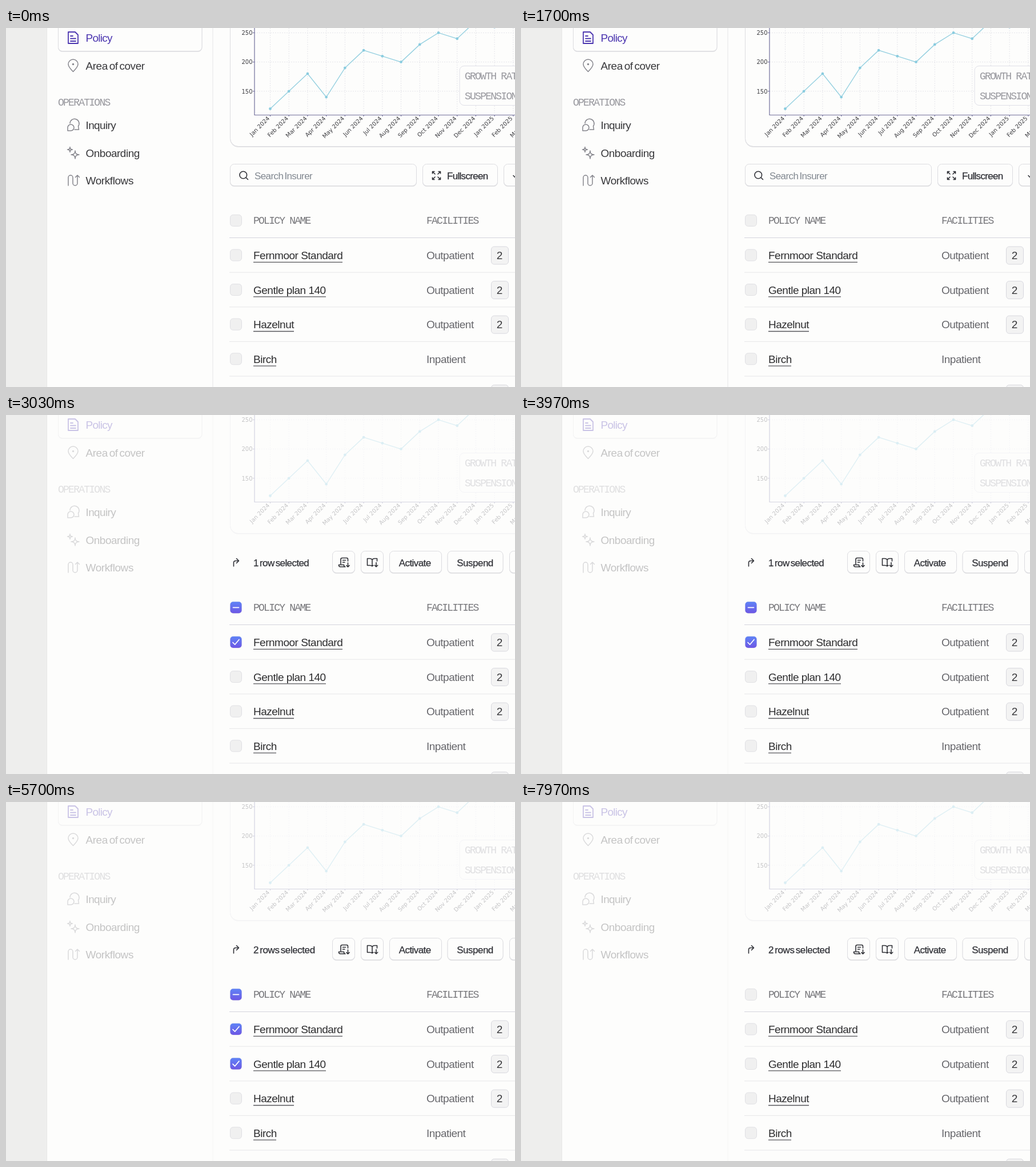
An HTML page for the animation above (8 s loop, 891 by 629 pixels).

```html
<!DOCTYPE html>
<html lang="en">
<head>
<meta charset="utf-8">
<title>Policy table</title>
<style>
  html, body { margin: 0; width: 100%; height: 100%; overflow: hidden; background: #fdfdfc; }
  svg { display: block; width: 891px; height: 629px; }
  text { font: 19px "Liberation Sans", Arial, sans-serif; letter-spacing: -.65px; word-spacing: -2px; fill: #38383b; }
  .name { letter-spacing: -.5px; word-spacing: 0; fill: #2c2c2e; }
  .cell { letter-spacing: -.5px; fill: #66666b; }
  .mono { font: 18px "Liberation Mono", monospace; letter-spacing: -1.75px; word-spacing: 0; fill: #77777b; }
  .pale { fill: #97979d; }
  .ui { font-size: 17px; fill: #2f3036; stroke: #2f3036; stroke-width: .25px; }
  .hint { font-size: 17px; letter-spacing: -.6px; fill: #818890; }
  .tick { font: 10px "DejaVu Sans", sans-serif; letter-spacing: 0; word-spacing: 0; fill: #3c3c40; }
  .icon { fill: none; stroke: #85858c; stroke-width: 1.5; stroke-linecap: round; stroke-linejoin: round; }
  .dark { stroke: #2f3036; stroke-width: 1.6; }
  .violet { stroke: #4c36b0; stroke-width: 1.8; }
  .grid { fill: none; stroke: #e5e5ea; stroke-dasharray: 2 2; }
  .axis { fill: none; stroke: #72709c; stroke-width: 1.2; }
  .rule { stroke: #e6e6e8; }
</style>
</head>
<body>
<svg viewBox="0 0 891 629">
  <defs>
    <linearGradient id="checked" x2="0" y2="1">
      <stop stop-color="#5f83f6"/><stop offset="1" stop-color="#6d57e4"/>
    </linearGradient>
    <clipPath id="barClip"><rect x="385" y="237.5" width="506" height="41.5"/></clipPath>
  </defs>
  <rect width="891" height="629" fill="#fdfdfc"/>
  <rect width="71" height="629" fill="#eeeeed"/>
  <path d="M71.5 0V629" stroke="#e8e8e6"/>
  <g id="backdrop"></g>
  <g id="table"></g>
  <g clip-path="url(#barClip)"><g id="searchBar"></g><g id="actionBar"></g></g>
</svg>
<script>
const LOOP = 8000;
const $ = id => document.getElementById(id);

function add(parent, tag, attrs = {}, content = '') {
  const el = document.createElementNS('http://www.w3.org/2000/svg', tag);
  for (const key in attrs) el.setAttribute(key, attrs[key]);
  el.textContent = content;
  return parent.appendChild(el);
}
const label = (parent, x, y, content, cls = '', spacing) =>
  add(parent, 'text', { x, y, class: cls, ...(spacing && { style: `letter-spacing:${spacing}px` }) }, content);
const icon = (parent, d, cls = '') => add(parent, 'path', { d, class: 'icon ' + cls });
const line = (parent, d, cls) => add(parent, 'path', { d, class: cls });

// A bordered panel with a slightly heavier lower edge.
function panel(parent, x, y, width, height, rx = 7) {
  add(parent, 'rect', { x, y: y + 1, width, height, rx, fill: '#cdcdd2', stroke: '#e6e6e8' });
  add(parent, 'rect', { x, y, width, height, rx, fill: '#fdfdfc', stroke: '#dcdce0' });
}

function drawSidebar(g) {
  line(g, 'M362 0V629', 'rule');
  panel(g, 91.5, -20, 251.5, 60.5);
  icon(g, 'M109 7H121L126 12V27H109ZM113 14H117M113 18.5H122M113 23H122', 'violet');
  label(g, 139.5, 24, 'Policy', '', -.75).style.fill = '#4c36b0';

  icon(g, 'M117.5 76.5C112 71 109 67.5 109 63.5A8.5 8.5 0 0 1 126 63.5C126 67.5 123 71 117.5 76.5Z');
  add(g, 'circle', { cx: 117.5, cy: 63.5, r: 1.7, fill: '#85858c' });
  label(g, 139.5, 72.5, 'Area of cover', '', -.45);

  label(g, 91, 136, 'OPERATIONS', 'mono pale');

  icon(g, 'M112 167A8 8 0 1 1 126.5 172L127.5 178H120');
  icon(g, 'M108 180V174.5A5.5 5.5 0 1 1 113.5 180Z');
  label(g, 139.5, 177, 'Inquiry');

  const star = (x, y, r) =>
    `M${x} ${y - r}Q${x} ${y} ${x + r} ${y}Q${x} ${y} ${x} ${y + r}Q${x} ${y} ${x - r} ${y}Q${x} ${y} ${x} ${y - r}Z`;
  icon(g, star(121, 222, 7) + star(112, 213, 4.5));
  label(g, 139.5, 225.5, 'Onboarding', '', -.5);

  icon(g, 'M109 276V262A4 4 0 0 1 117 262V272A4 4 0 0 0 125 272V258M121.5 261.5L125 258L128.5 261.5');
  label(g, 139.5, 274, 'Workflows', '', -.42);
}

function drawChart(g) {
  panel(g, 392.5, -40, 560, 247.5, 14);
  const values = [120, 150, 180, 140, 190, 220, 210, 200, 230, 250, 240, 270, 260, 280, 290];
  const months = 'Jan Feb Mar Apr May Jun Jul Aug Sep Oct Nov Dec'.split(' ');
  const px = i => 462.5 + 32.72 * i;
  const py = v => 8.4 + (250 - v) * 1.024;

  for (const v of [250, 200, 150]) {
    line(g, `M435 ${py(v)}H891`, 'grid');
    line(g, `M432 ${py(v)}H435`, 'axis');
    add(g, 'text', { x: 431.5, y: py(v) + 3.7, class: 'tick', 'text-anchor': 'end' }, v);
  }
  values.forEach((v, i) => {
    line(g, `M${px(i)} 0V152`, 'grid');
    line(g, `M${px(i)} 152V155`, 'axis');
    add(g, 'text', {
      class: 'tick', 'text-anchor': 'end',
      transform: `translate(${px(i) - .5} 159) rotate(-45)`
    }, `${months[i % 12]} ${2024 + Math.floor(i / 12)}`);
  });
  line(g, 'M435 0V152.5H891', 'axis');
  add(g, 'polyline', {
    points: values.map((v, i) => [px(i), py(v)]).join(' '),
    fill: 'none', stroke: '#96d0e0', 'stroke-width': 1.4
  });
  values.forEach((v, i) => add(g, 'circle', { cx: px(i), cy: py(v), r: 2.4, fill: '#8accdf' }));

  add(g, 'rect', { x: 794, y: 66.5, width: 160, height: 69, rx: 8, fill: '#fdfdfc', stroke: '#e0e0e8' });
  label(g, 803, 89.5, 'GROWTH RATE', 'mono pale');
  label(g, 803, 124.5, 'SUSPENSION', 'mono pale');
}

function checkbox(g, y, mark) {
  add(g, 'rect', { x: 392.5, y: y - 10, width: 20, height: 20, rx: 5, fill: '#f0f0f0', stroke: '#dfdfe3' });
  const on = add(g, 'g', { opacity: 0 });
  add(on, 'rect', { x: 392.5, y: y - 10, width: 20, height: 20, rx: 5, fill: 'url(#checked)' });
  add(on, 'path', {
    d: mark, transform: `translate(402.5 ${y})`, fill: 'none', stroke: '#fff',
    'stroke-width': 1.7, 'stroke-linecap': 'round', 'stroke-linejoin': 'round'
  });
  return on;
}

function drawTable(g) {
  const tick = 'M-5.5 .5L-1.8 4.2L5.5 -4.5';
  const marks = [checkbox(g, 337.3, 'M-5 0H5')];
  label(g, 433, 343.3, 'POLICY NAME', 'mono');
  label(g, 736, 343.3, 'FACILITIES', 'mono');
  line(g, 'M391 367.5H891', 'rule').style.stroke = '#d3d3dc';

  const rows = [['Fernmoor Standard', 156], ['Gentle plan 140', 127], ['Hazelnut', 71], ['Birch', 40], ['', 0]];
  rows.forEach(([name, width], i) => {
    const y = 398 + 60.6 * i;
    marks.push(checkbox(g, y, tick));
    label(g, 433, y + 7.2, name, 'name');
    add(g, 'path', { d: `M433 ${y + 12.3}h${width}`, stroke: '#55555a', 'stroke-width': 1.3 });
    line(g, `M391 ${y + 30.2}H891`, 'rule');
    const inpatient = i === 3;
    label(g, 736, y + 7.2, inpatient ? 'Inpatient' : 'Outpatient', 'cell');
    if (inpatient) return;
    add(g, 'rect', { x: 849.5, y: y - 15, width: 30, height: 31, rx: 5, fill: '#f3f3f3', stroke: '#d8d8de' });
    label(g, 858.8, y + 7.2, '2');
  });
  return marks;
}

function drawSearchBar(g) {
  panel(g, 392.5, 238.5, 326, 38);
  icon(g, 'M409 257.5a6.3 6.3 0 1 0 12.6 0a6.3 6.3 0 1 0 -12.6 0M420 262L423.5 265.5', 'dark');
  label(g, 435, 264.5, 'Search Insurer', 'hint');
  panel(g, 729.5, 238.5, 131, 38);
  icon(g, 'M746.5 255V251.5H750M747 252L751 256M757 251.5H760.5V255M760 252L756 256' +
          'M746.5 262V265.5H750M747 265L751 261M757 265.5H760.5V262M760 265L756 261', 'dark');
  label(g, 772, 264.5, 'Fullscreen', 'ui', -.7);
  panel(g, 871.5, 238.5, 90, 38);
  icon(g, 'M893.5 251V264M888 258.5L893.5 264L899 258.5', 'dark');
}

function drawActionBar(g) {
  icon(g, 'M398.5 265V259Q398.5 255.5 402 255.5H407M403.5 251.5L407.5 255.5L403.5 259.5', 'dark');
  const counts = [label(g, 433, 264.5, '1 row selected', 'ui', -.6),
                  label(g, 433, 264.5, '2 rows selected', 'ui', -.43)];
  [[571.5, 39], [621.5, 39], [671.5, 91], [773, 97], [881.5, 90]]
    .forEach(([x, width]) => panel(g, x, 238.5, width, 38));
  icon(g, 'M586 261V253Q586 250.5 588.5 250.5H596.5Q598.5 250.5 598.5 253V256M589.5 254.5H594.5M589.5 258H593' +
          'M592 266H585.5Q582.5 266 582.5 262.5H591.5Q591.5 266 594 266M598.5 259V266M595.8 263.5L598.5 266.2L601.2 263.5', 'dark');
  icon(g, 'M641 265V254Q640 251.5 637 251.5H632.5V263.5H637.5Q640 263.5 641 265Q641.6 263.8 643 263.5' +
          'M641 254Q642 251.5 645 251.5H649.5V256M648 258.5V266M645.3 263.3L648 266L650.7 263.3', 'dark');
  label(g, 687.7, 264.5, 'Activate', 'ui', -.56);
  label(g, 789.2, 264.5, 'Suspend', 'ui', -.5);
  return counts;
}

// Steps: [time, value, easing towards the next step]
function animate(el, prop, steps) {
  const full = [[0, steps[0][1]], ...steps, [LOOP, steps.at(-1)[1]]];
  const frames = full.map(([time, value, easing = 'linear']) => ({ offset: time / LOOP, [prop]: value, easing }));
  el.animate(frames, { duration: LOOP, iterations: Infinity });
}
const shiftY = y => `translateY(${y}px)`;

drawSidebar($('backdrop'));
drawChart($('backdrop'));
const [headMark, firstMark, secondMark] = drawTable($('table'));
drawSearchBar($('searchBar'));
const [oneRow, twoRows] = drawActionBar($('actionBar'));

const FIRST = 2150, SECOND = 4350, CLEAR = 7820, FADE = 120;
const checkSpan = from => [[from, 0, 'ease-out'], [from + FADE, 1], [CLEAR, 1, 'ease-out'], [CLEAR + FADE, 0]];

animate(headMark, 'opacity', checkSpan(FIRST));
animate(firstMark, 'opacity', checkSpan(FIRST));
animate(secondMark, 'opacity', checkSpan(SECOND));
animate($('backdrop'), 'opacity', [[FIRST, 1, 'ease-out'], [FIRST + 400, .29]]);
animate($('searchBar'), 'transform', [[2390, shiftY(0), 'ease-in-out'], [2690, shiftY(-42)]]);
animate($('actionBar'), 'transform', [[2690, shiftY(42), 'ease-out'], [2990, shiftY(0)]]);
animate(oneRow, 'opacity', [[SECOND, 1], [SECOND, 0]]);
animate(twoRows, 'opacity', [[SECOND, 0], [SECOND, 1]]);
</script>
</body>
</html>
```
